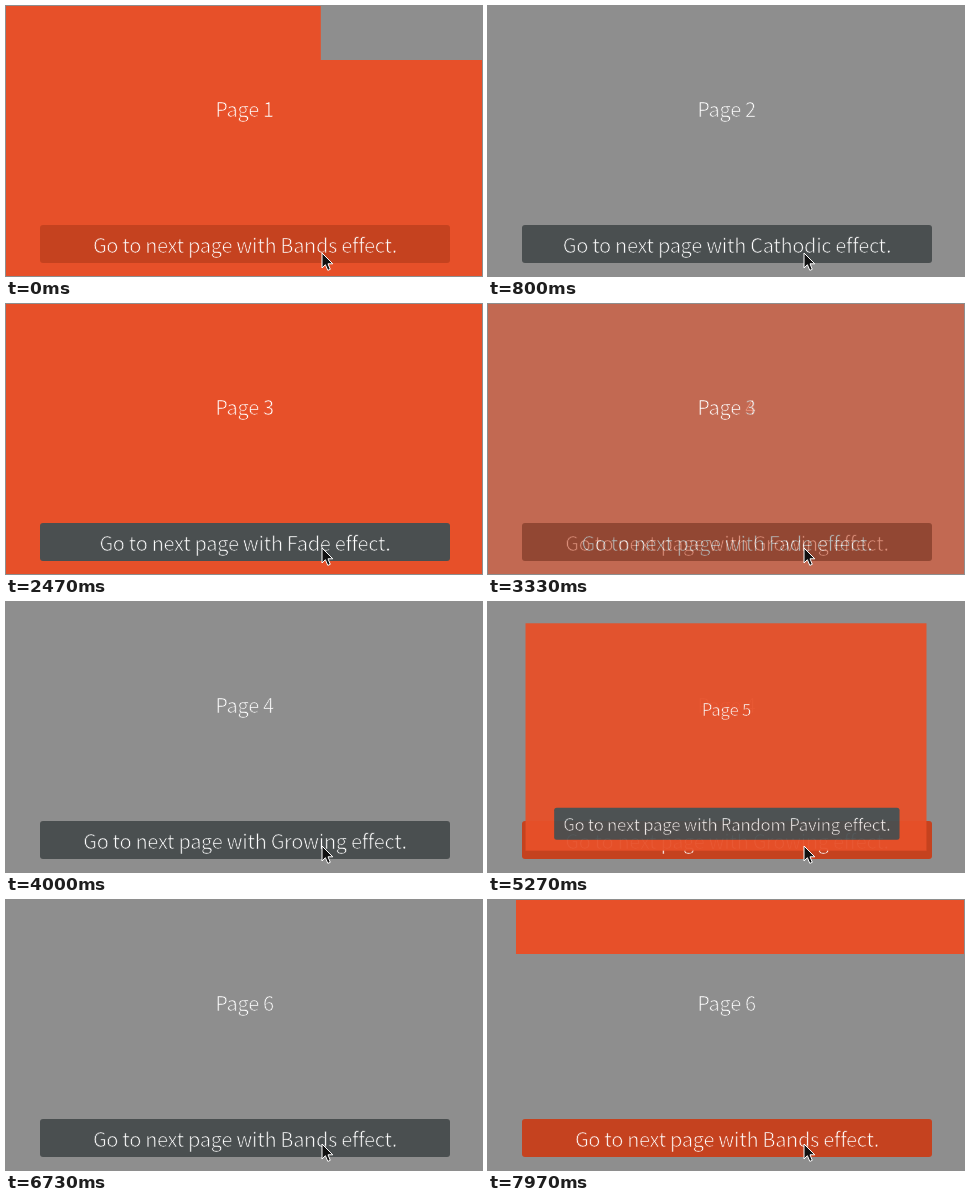
Animation of 476x270 px, one loop 8000 ms. Source, as an HTML page:

```html
<!DOCTYPE html>
<html lang="en">
<head>
<meta charset="utf-8">
<title>Page transitions</title>
<style>
  html, body { margin: 0; width: 100%; height: 100%; overflow: hidden; background: #8e8e8e; }
  svg { display: block; width: 476px; height: 270px; }
  /* A stroke in the background colour thins the letters to a light weight. */
  text {
    font: 300 20px "Noto Sans CJK JP", "Noto Sans CJK SC", "Noto Sans CJK", "Open Sans", sans-serif;
    letter-spacing: -.33px;
    fill: #fff;
    stroke-width: .7px;
    text-anchor: middle;
  }
</style>
</head>
<body>
<svg viewBox="0 0 476 270">
  <defs><clipPath id="reveal"><path id="mask"/></clipPath></defs>
  <g id="back"></g>
  <g id="clip"><g id="front"></g></g>
  <path id="cursor" d="M0 0V15L3.4 11.7L5.8 17.4L8.3 16.3L6 10.8H10.8Z"
        fill="#111" stroke="#fff" stroke-width="1" stroke-linejoin="round"/>
</svg>
<script>
const W = 476, H = 270, LOOP = 8000;
const ORANGE = "#e75029", GREY = "#8e8e8e", REST = "#4a4f50", PRESSED = "#c5421f";
const BAND_H = 54, BAND_MS = 171;
const COLS = 10, ROWS = 5;
const effects = ["Bands", "Cathodic", "Fade", "Growing", "Random Paving", "Bands", "Cathodic"];

// Page i leaves when its button is pressed; the effect runs from start to end.
const steps = [
  { press: -170, start: -57, end: 798, run: bands },
  { press: 1200, start: 1290, end: 2440, run: cathodic },
  { press: 2970, start: 3050, end: 3730, run: fade },
  { press: 4770, start: 4868, end: 5500, run: grow },
  { press: 6230, start: 6310, end: 6720, run: pave },
  { press: 7700, start: 7810, end: 8665, run: bands }
];

const $ = id => document.getElementById(id);
const clamp = v => Math.max(0, Math.min(1, v));
const scaled = (x, y) =>
  `translate(${W / 2} ${H / 2}) scale(${x} ${y}) translate(${-W / 2} ${-H / 2})`;
const box = (x, y, w, h) => `M${x} ${y}h${w}v${h}h${-w}z`;

function makeLayer(id) {
  const g = $(id);
  g.innerHTML = `<rect width="${W}" height="${H}"/>
    <rect x="34" y="219" width="410" height="38" rx="3"/>
    <text x="238.5" y="110.5"></text><text x="239" y="246.5"></text>`;
  const [bg, button, title, label] = g.children;
  return { g, bg, button, title, label };
}

const back = makeLayer("back"), front = makeLayer("front");

function write(text, content, ground) {
  text.textContent = content;
  text.setAttribute("stroke", ground);
}

function fill(layer, page, pressed) {
  const ground = page % 2 ? GREY : ORANGE, face = pressed ? PRESSED : REST;
  layer.bg.setAttribute("fill", ground);
  layer.button.setAttribute("fill", face);
  write(layer.title, `Page ${page + 1}`, ground);
  write(layer.label, `Go to next page with ${effects[page]} effect.`, face);
}

function place(layer, transform, opacity) {
  layer.g.setAttribute("transform", transform);
  layer.g.setAttribute("opacity", opacity);
}

function setMask(d) {
  $("mask").setAttribute("d", d);
  $("clip").setAttribute("clip-path", "url(#reveal)");
}

// Each band is a slice of the next page sliding in from the right.
const slices = Array.from({ length: H / BAND_H }, (_, i) => {
  const id = `band${i}`;
  const outer = document.createElementNS("http://www.w3.org/2000/svg", "g");
  outer.innerHTML = `<clipPath id="c${id}"><path d="${box(0, i * BAND_H, W, BAND_H)}"/></clipPath>
    <g clip-path="url(#c${id})"><g id="${id}"></g></g>`;
  $("back").after(outer);
  return { outer, layer: makeLayer(id) };
});

function bands(p, ms, page) {
  slices.forEach(({ outer, layer }, i) => {
    const x = W * (1 - clamp(ms / BAND_MS - i));
    fill(layer, page + 1, false);
    outer.setAttribute("transform", `translate(${x} 0)`);
    outer.setAttribute("display", x < W ? "inline" : "none");
  });
}

// The old page squashes to a line, then the line closes to a point.
function cathodic(p, ms, page) {
  fill(back, page + 1, false);
  fill(front, page, true);
  const y = Math.max(.008, 1 - clamp(ms / 932) ** 2);
  const x = 1 - clamp((ms - 932) / 200);
  place(front, scaled(x, y), x ? 1 : 0);
}

function fade(p, ms, page) {
  fill(front, page + 1, false);
  place(front, "", p);
}

function grow(p, ms, page) {
  const s = Math.sin(p * Math.PI / 2);
  fill(front, page + 1, false);
  place(front, scaled(s, s), s ** .3);
}

let seed = 7;
const random = () => (seed = seed * 16807 % 2147483647) / 2147483647;
const tiles = Array.from({ length: COLS * ROWS }, (_, i) => ({ i, key: random() }))
  .sort((a, b) => a.key - b.key);

function pave(p, ms, page) {
  const w = W / COLS, h = H / ROWS;
  fill(front, page + 1, false);
  place(front, "", 1);
  setMask(tiles.slice(0, Math.round(p * tiles.length))
    .map(({ i }) => box(i % COLS * w, Math.floor(i / COLS) * h, w, h)).join("") || "M0 0");
}

function draw(t) {
  const page = steps.filter(s => t >= s.end).length;
  const step = steps[page];
  fill(back, page, t >= step.press);
  place(back, "", 1);
  place(front, "", 0);
  $("clip").removeAttribute("clip-path");
  slices.forEach(s => s.outer.setAttribute("display", "none"));
  if (t >= step.start) {
    step.run(clamp((t - step.start) / (step.end - step.start)), t - step.start, page);
  }
  const lift = 3 * clamp((t - 2050) / 150);
  $("cursor").setAttribute("transform", `translate(316 ${247 - lift})`);
}

const origin = performance.now();
function tick() {
  draw((performance.now() - origin) % LOOP);
  requestAnimationFrame(tick);
}
draw(0);
requestAnimationFrame(tick);
</script>
</body>
</html>
```
